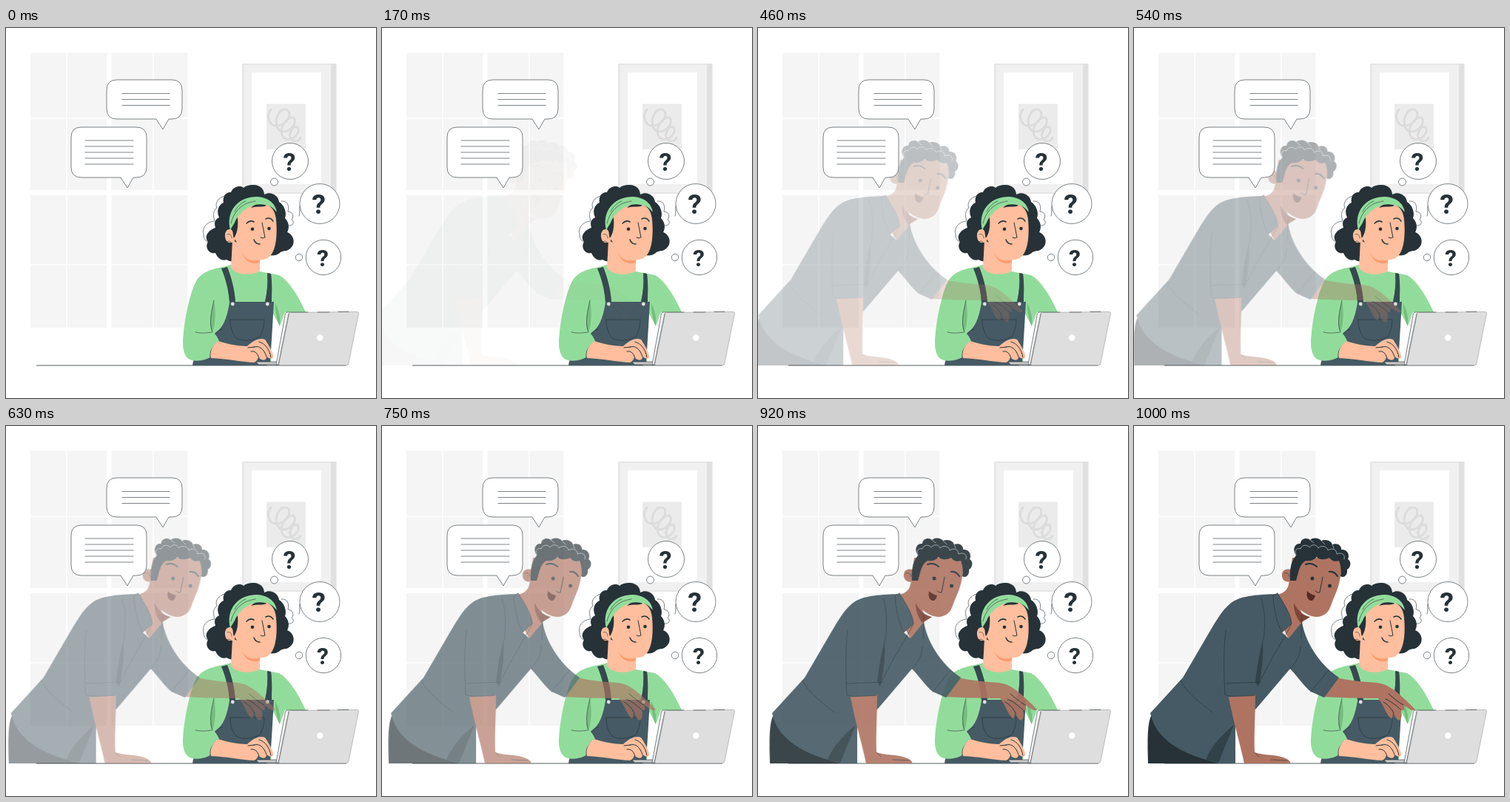
These frames come from a looping animation (500 px wide and 500 px high, 1.04 s). An HTML page:

```html
<!DOCTYPE html>
<html lang="en">
<head>
<meta charset="utf-8">
<title>Helping at the laptop</title>
<style>
  html, body { margin: 0; width: 100%; height: 100%; overflow: hidden; background: #fff; }
  svg { display: block; width: 100vw; height: 100vh; }
  .ink { fill: none; stroke: #263238; stroke-width: .6; stroke-linecap: round; stroke-linejoin: round; }
  .bold { stroke-width: 1; }
  .curl { stroke: #dfe4e6; }
  .bubble { fill: #fff; stroke: #263238; stroke-width: .6; }
  .brow { fill: none; stroke: #263238; stroke-width: 1.5; stroke-linecap: round; }
  .thick { stroke-width: 2.1; }
  .dark { fill: #263238; }
  .slate { fill: #455a64; }
  .green { fill: #92dc9b; }
  .peach { fill: #ffbe9d; }
  .brown { fill: #ae7461; }
  text { font-family: Roboto, "Open Sans", sans-serif; font-weight: 700; fill: #263238; text-anchor: middle; }
  #man { animation: enter 1s cubic-bezier(.42, 0, .75, .75) both paused; }
  @keyframes enter {
    from { opacity: 0; transform: translateX(-30px); }
    to { opacity: 1; transform: none; }
  }
</style>
</head>
<body>
<svg viewBox="0 0 500 500">
  <g id="window">
    <path fill="#f5f5f5" d="M33 33.500H136V219H33ZM142.500 33.500H245.500V219H142.500ZM33 226H136V405H33ZM142.500 226H245.500V405H142.500Z"/>
    <path stroke="#fff" stroke-width="1.600" d="M82 33V405M199 33V405M33 122H246M33 320H246"/>
  </g>

  <g id="picture">
    <path fill="#e0e0e0" d="M319 48H446.500V224H319Z"/>
    <path fill="#e6e6e6" d="M319 48H439V224H319Z"/>
    <path fill="#f0f0f0" d="M321.500 50H439V222H321.500Z"/>
    <path fill="#fff" d="M332 60H426V211H332Z"/>
    <path fill="#ebebeb" d="M352 102.500H405V164H352Z"/>
    <path fill="none" stroke="#dbdbdb" stroke-width="2.800" stroke-linecap="round"
      d="M358 110C351 119 355 133 367 132C382 130 388 112 378 110C366 109 360 132 371 139C383 144 396 126 388 121C378 119 366 140 376 149C386 155 400 141 394 134C388 130 380 144 386 151C390 155 397 152 398 148"/>
  </g>

  <g id="thoughts">
    <circle class="bubble" cx="384" cy="180" r="24.500"/>
    <circle class="bubble" cx="362.500" cy="208" r="5"/>
    <circle class="bubble" cx="424" cy="237.500" r="27"/>
    <path class="ink" d="M397 241C396 246 398 250 396 254"/>
    <circle class="bubble" cx="429" cy="310" r="23.700"/>
    <circle class="bubble" cx="396" cy="310" r="4.700"/>
    <text x="383" y="193" font-size="34">?</text>
    <text x="422.500" y="251" font-size="37.500">?</text>
    <text x="428" y="322" font-size="32">?</text>
  </g>

  <path stroke="#8c9296" stroke-width="1.300" d="M41 456H460"/>

  <g id="woman">
    <path class="ink" d="M298 226C286 229 282 237 285 243C278 248 281 257 282 261C269 262 265 272 267 279C267 285 270 288 273 289M372 234C380 233 383 239 381 248C389 249 389 256 386 259C391 263 387 268 382 267"/>
    <path class="dark" d="M333 212C343 211 349 218 349 225C358 220 368 226 369 235C376 239 380 250 377 257C383 263 383 271 380 276C390 280 391 292 385 297C380 303 375 300 371 303C364 310 356 306 354 308C344 316 330 310 320 308C313 316 304 317 298 313C292 316 285 310 283 304C275 306 268 297 273 289C267 281 274 273 283 270C281 263 282 259 288 256C284 247 287 239 294 236C292 227 298 221 304 222C307 214 317 212 321 216C324 213 329 212 333 212Z"/>

    <path class="green" d="M304 320C288 325 267 325 257 342C248 359 240 398 239 426C239 443 247 450 263 449L358 452V380L370 403L377 384H405C395 362 382 341 369 334L343 329Z"/>
    <path fill="#74bd7e" d="M281 368C276 388 274 404 279 411C283 400 284 384 281 368ZM364 372C364 384 366 394 370 403C371 392 369 382 364 372Z"/>
    <path class="peach" d="M306 287L304 324C312 335 334 335 343 328V304Z"/>
    <path fill="#ff9a6c" d="M319 303C323 313 333 317 343 313V317C331 321 322 314 319 303Z"/>
    <path class="peach" d="M308 262C312 246 326 236 343 236C357 237 364 246 365 259C367 280 365 301 356 309C345 319 323 311 315 294L308 284Z"/>
    <path class="peach" d="M309 274C302 269 295 273 296 282C297 291 304 292 309 288Z"/>
    <path class="ink" d="M299 279C302 277 305 280 305 284"/>
    <circle class="ink" cx="301" cy="291.500" r="3.500"/>
    <path class="dark" d="M304 272C306 264 309 259 313 256C314 267 313 277 308 284C306 280 308 275 304 272ZM331 243C337 236 346 235 352 240C347 243 339 240 331 243Z"/>
    <path class="green" d="M303 273C297 249 312 229 337 228C353 228 364 236 366 249C360 242 356 239 350 239C342 237 333 239 327 243C318 248 312 255 309 263Z"/>
    <path class="ink" d="M304 264C308 247 320 236 337 234M309 248C312 242 318 236 324 234"/>
    <circle class="dark" cx="333" cy="271.700" r="2.300"/>
    <circle class="dark" cx="355.500" cy="271" r="2.300"/>
    <path class="brow" d="M325 264Q330 259 335 262M351 258Q357 255 361 261"/>
    <path class="ink bold" d="M346 263L350 283Q347 285 344 283"/>
    <path class="brow" d="M335 286Q337 292 343 292"/>

    <path class="slate" d="M291 325L299 323C305 338 309 354 310 370H350C353 357 354 344 353 331L358 332C360 346 359 360 359 370H362C361 388 359 424 357 452L352 456H252C253 444 260 440 273 435L283 412C294 405 299 390 302 371C301 355 297 339 291 325Z"/>
    <path class="dark" opacity=".45" d="M291 325L299 323C305 338 309 354 310 370H302C301 355 297 339 291 325ZM353 331L358 332C360 346 359 360 359 370H350C353 357 354 344 353 331Z"/>
    <path class="ink" d="M303 394H349C349 404 346 412 343 417C333 423 319 424 311 419C305 412 303 404 303 394ZM292 407C284 409 280 414 282 423"/>
    <circle cx="306.300" cy="373" r="2.400" fill="#e0e0e0"/>
    <circle cx="353.300" cy="373" r="2.400" fill="#e0e0e0"/>

    <path class="green" d="M241 405C239 430 238 445 251 449C262 451 270 448 276 445C275 437 279 428 288 423C284 413 280 411 275 411Z"/>
    <path class="ink" d="M256 411C264 413 272 412 278 411M288 423C279 428 275 437 276 445M281 368C276 389 275 401 279 411"/>
    <path class="peach" d="M287 423C299 427 313 430 326 430C334 423 342 418 350 421C354 427 358 433 361 442C362 449 356 447 352 444C352 451 344 449 341 445C339 450 337 452 334 452C318 451 298 447 277 446C275 438 279 427 287 423Z"/>
    <path class="ink bold" d="M335 431C343 429 348 433 352 444M331 437C337 436 340 440 342 446M342 424C350 426 356 434 358 445M336 431L327 432"/>
  </g>

  <g id="laptop">
    <path fill="#c7c7c7" stroke="#263238" stroke-width=".6" d="M338 451H370V455H341Z"/>
    <path fill="#f5f5f5" stroke="#263238" stroke-width=".6" d="M377.500 386Q378 384 381 384H386L371 455H365Z"/>
    <path fill="#dedede" stroke="#9b9b9b" stroke-width=".6" d="M383 384.500L474 383.500Q477 383.500 476.500 386L463 453Q462.500 455.500 460 455.500H368.500Z"/>
    <path class="ink" d="M382 386L368 455M386 384H408M421 384H437M449 383.500H463"/>
    <circle cx="424.300" cy="418.500" r="4.200" fill="#fff"/>
  </g>

  <g id="man">
    <path class="dark" d="M23 392C18 403 18 425 19 456H137V405Z"/>

    <path class="brown" d="M274 340C291 344 313 346 329 347C342 349 351 356 359 363C367 370 375 378 380 383C376 387 369 380 364 377C367 384 364 387 360 382C363 389 362 396 358 398C353 395 352 390 350 386C350 392 349 396 347 395C340 389 338 378 330 368C302 368 276 367 256 366Z"/>
    <path class="ink bold" d="M344 362C351 368 358 374 364 377M340 369C349 373 356 379 360 383M337 373C344 377 348 382 351 388"/>

    <path class="brown" d="M210 204C210 218 206 226 192 228L203 276L209 288L227 268V254Z"/>
    <path fill="#7d4538" d="M216 239C221 250 229 256 238 258L225 266C219 258 216 251 216 239Z"/>

    <path class="slate" d="M193 227C172 228 144 228 130 240C118 250 110 265 101 280L66 340L22 388C24 396 27 405 34 414C51 435 75 444 97 451L114 456H137V403L165 382L211 328C222 340 231 353 239 359Q248 363 257 367L277 340C249 321 231 290 227 265L209 287L200 279Z"/>
    <path class="brown" d="M127 362H164C164 389 162 416 163 441C174 445 192 444 202 448C209 451 212 453 211 456H149C145 435 134 399 127 362Z"/>
    <path class="ink" d="M163 441L169 447M185 451L207 452"/>
    <path class="slate" d="M124 276C121 300 121 330 123 363Q126 367 129 366L163 364L171 346L173 300Z"/>
    <path class="dark" opacity=".6" d="M174 289C169 309 166 328 164 346L168 352C173 332 175 310 174 289ZM135 404C123 414 105 430 97 451L114 455Z"/>
    <path class="slate" d="M188 229L194 226C202 239 212 254 213 267L200 279C192 264 189 246 188 229Z"/>
    <path class="ink" d="M194 226C202 239 212 254 213 267L200 279C192 264 189 246 188 229L194 226M227 256L226 288M213 267C205 284 188 309 168 349M172 233C178 252 177 272 175 290M123 348L171 346M124 276C121 300 121 330 123 363M63 344C72 361 87 372 106 387M211 328C220 318 225 309 225 298M239 359L263 330M123 363Q126 367 163 364"/>

    <path class="brown" d="M213 195C205 191 199 196 200 203C201 211 209 212 214 209Z"/>
    <path class="ink" d="M203 199C207 197 210 201 211 206"/>
    <path class="brown" d="M214 178H279C282 192 279 213 271 230C265 243 265 252 255 256C243 262 227 253 216 239L210 205Z"/>
    <path class="dark" d="M211 209C210 195 212 183 219 175C213 166 218 158 225 159C225 152 234 150 238 154C242 150 250 151 253 155C260 152 267 156 268 160C276 157 281 163 280 167C288 166 292 174 289 180C295 184 292 192 288 194C289 202 283 206 279 203C280 197 280 190 277 182C271 184 267 182 264 178C256 182 249 180 247 177C242 182 237 183 232 182C223 187 222 200 219 209Z"/>
    <path class="ink curl" d="M219 174C216 169 220 164 225 166C227 160 234 160 237 164C241 159 247 160 249 165C254 160 261 163 262 168C268 164 274 167 274 173C281 170 286 174 284 180M238 154L243 158M253 155L258 160M268 160L270 165"/>
    <circle class="dark" cx="241" cy="206" r="2.500"/>
    <circle class="dark" cx="264.500" cy="216" r="2.500"/>
    <path class="brow thick" d="M232 187Q240 184 247 190M264 197Q271 196 275 203"/>
    <path class="ink bold" d="M255 204L251 225Q248 226 245 223"/>
    <path fill="#552a24" d="M234 223Q239 228 245 229Q243 237 238 236Q232 233 234 223Z"/>
  </g>

  <g id="speech">
    <path class="bubble" d="M150 70H224Q238 70 238 84V109Q238 123 224 123H220L212 137L203 123H150Q136 123 136 109V84Q136 70 150 70Z"/>
    <path class="bubble" d="M102 134H176Q190 134 190 148V188Q190 202 176 202H172L164 216L155 202H102Q88 202 88 188V148Q88 134 102 134Z"/>
    <path class="ink" d="M157 88.500H221M157 96.500H221M157 104.500H221M107 152H172M107 160H172M107 168H172M107 176H172M107 184H172"/>
  </g>
</svg>
<script>
  const LOOP = 1040, STEP = 1000 / 24;
  const entrance = document.getElementById('man').getAnimations()[0];
  const start = performance.now();

  // The entrance advances at 24 steps per second and holds its last pose.
  function draw() {
    const time = (performance.now() - start) % LOOP;
    const step = Math.min(24, Math.floor((time + 5) / STEP));
    entrance.currentTime = step * STEP;
    requestAnimationFrame(draw);
  }
  draw();
</script>
</body>
</html>
```
